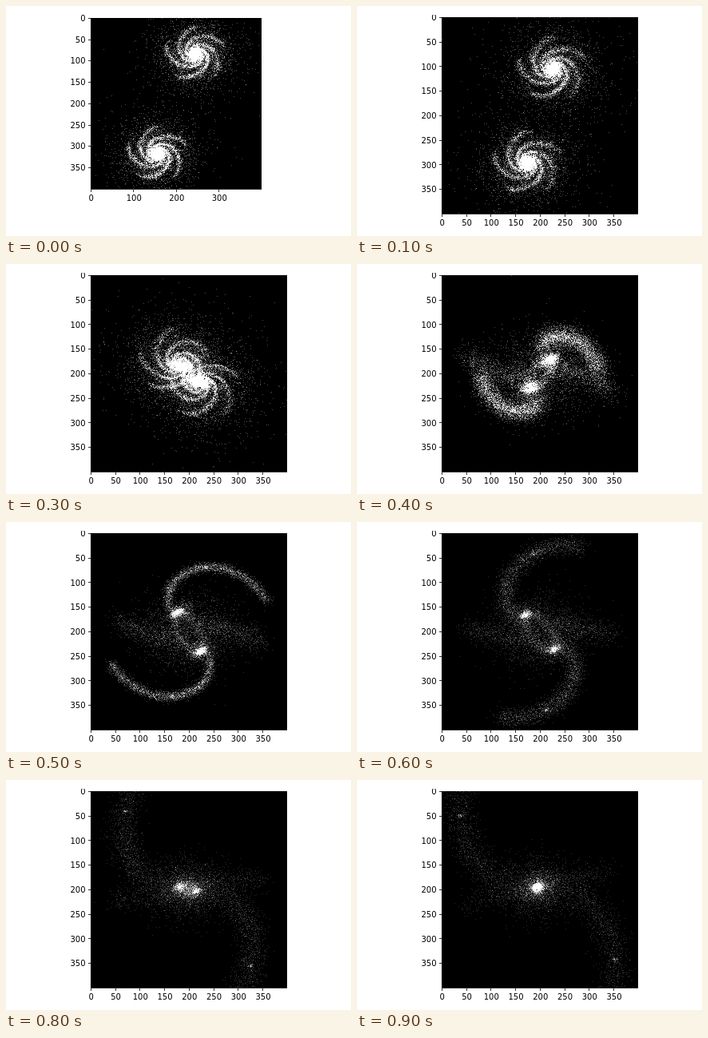
These frames come from a looping animation (432x288 px, 1000 ms). An HTML page with a canvas:

```html
<!DOCTYPE html>
<html lang="en">
<head>
<meta charset="utf-8">
<title>Galaxy collision</title>
<style>
  html, body { margin: 0; width: 100%; height: 100%; overflow: hidden; background: #fff; }
  canvas, svg { position: absolute; left: 0; top: 0; width: 432px; height: 288px; }
  text { font: 10px "DejaVu Sans", Verdana, sans-serif; fill: #000; }
</style>
</head>
<body>
<canvas id="stars" width="432" height="288"></canvas>
<svg id="axes" viewBox="0 0 432 288"></svg>
<script>
const W = 432, H = 288, STEP = 100, COUNT = 10, MEET = 4;
const TAU = Math.PI * 2, DEG = Math.PI / 180;
const ctx = document.getElementById('stars').getContext('2d');
const axes = document.getElementById('axes');

// Plot box in pixels; it shows an image of 400 x 400 units.
const SMALL = { x: 106, y: 15, size: 214, xStep: 100 };
const LARGE = { x: 106, y: 14, size: 246, xStep: 50 };
let box = SMALL;

let seed = 1;
function rand() {
  seed = (seed + 0x6D2B79F5) | 0;
  let t = Math.imul(seed ^ (seed >>> 15), 1 | seed);
  t = (t + Math.imul(t ^ (t >>> 7), 61 | t)) ^ t;
  return ((t ^ (t >>> 14)) >>> 0) / 4294967296;
}
const gauss = () => Math.sqrt(-2 * Math.log(1 - rand())) * Math.cos(TAU * rand());
const mix = (a, b, t) => a + (b - a) * t;
const polar = (r, a) => [r * Math.cos(a), r * Math.sin(a)];

// Straight lines between [time, value] points.
function track(t, ...keys) {
  let i = 0;
  while (i < keys.length - 2 && t >= keys[i + 1][0]) i++;
  const [[t0, a], [t1, b]] = keys.slice(i, i + 2);
  return mix(a, b, (t - t0) / (t1 - t0));
}

// Place of one core relative to the middle; the other is opposite.
function orbit(t) {
  const r = track(t, [0, 125], [1, 99], [2, 63], [3, 25], [5, 46], [6, 46], [7, 36], [9, 1]);
  const a = track(t, [0, -69], [1, -75], [2, -89], [3, -140], [4, -235], [5, -300], [7, -321], [9, -370]);
  return polar(r, a * DEG);
}

const density = new Float32Array(W * H);
let middle = [200, 200];

// Adds one star, in units from the middle.
function star(x, y) {
  const k = box.size / 400;
  const px = Math.floor(box.x + (middle[0] + x) * k);
  const py = Math.floor(box.y + (middle[1] + y) * k);
  if (px < box.x || py < box.y || px >= box.x + box.size || py >= box.y + box.size) return;
  density[py * W + px]++;
}

function blob(n, x, y, sx, sy = sx, angle = 0) {
  const c = Math.cos(angle), s = Math.sin(angle);
  for (let i = 0; i < n; i++) {
    const u = gauss() * sx, v = gauss() * sy;
    star(x + u * c - v * s, y + u * s + v * c);
  }
}

// Stars along a curve given by a function of 0..1.
function stream(n, spread, curve) {
  for (let i = 0; i < n; i++) {
    const [x, y] = curve(rand());
    star(x + gauss() * spread, y + gauss() * spread);
  }
}

// Exponential disc with five spiral arms; the pull drags its outer part aside.
function galaxy(x, y, pull) {
  const put = (r, a) => {
    const [u, v] = polar(r, a), drag = 0.7 * pull * r / 70;
    star(x * (1 + drag) + u, y * (1 + drag) + v * 0.9);
  };
  for (let i = 0; i < 2900; i++) {
    const r = 11 + 62 * Math.pow(rand(), 1.15);
    const arm = Math.floor(5 * Math.pow(rand(), 1.2)) * TAU / 5;
    put(r + gauss() * 2, 0.45 + arm + 2.1 * Math.log(r / 32) + gauss() * 0.13);
  }
  for (let i = 0; i < 3900; i++) put(-24 * Math.log((1 - rand()) * (1 - rand())), TAU * rand());
  blob(1700, x, y, 7 + 5 * pull, 6.4 - pull, 0.75 * pull - 0.5);
}

function approach(t) {
  const [x, y] = orbit(t), pull = Math.max(0, t - 2);
  galaxy(x, y, pull);
  galaxy(-x, -y, pull);
  return 0.3;
}

// Two shrinking cores with tidal tails that unwind outwards.
function aftermath(t) {
  const age = t - MEET, part = age / 5;
  const decay = rate => Math.exp(-rate * age);
  const [cx, cy] = orbit(t);

  const start = track(t, [4, -90], [5, -130], [7, -172], [9, -175]);
  const sweep = track(t, [4, 90], [5, 109], [7, 64], [9, 50]);
  const reach = track(t, [4, 122], [5, 172], [7, 212], [9, 262]);
  const power = track(t, [4, 0.5], [5, 0.5], [7, 0.75], [9, 1]);
  const width = track(t, [4, 11], [5, 5.5], [7, 15], [9, 17]);
  const knot = track(t, [4, 0.4], [5, 0.5], [7, 0.8], [9, 0.76]);
  const root = 44 + 4 * age;
  const tail = u => polar(mix(root, reach, Math.pow(u, power)), (start + sweep * u) * DEG);
  const arc = u => {
    const c = Math.cos(Math.PI * u), s = 0.45 * Math.sin(Math.PI * u);
    return [cx * c + cy * s, cy * c - cx * s];
  };
  const fan = u => [10 + 140 * u, -14 + 38 * (1.4 - 0.4 * age) * u * u];

  for (const side of [1, -1]) {
    const turned = curve => u => curve(u).map(v => v * side);
    const [kx, ky] = turned(tail)(knot);
    const x = cx * side, y = cy * side;
    stream(850 + 2500 * decay(0.5), width, turned(tail));
    stream(450, 6, turned(arc));
    stream(900 * decay(0.25), 13, turned(fan));
    blob(45, kx, ky, 3, 2);
    blob(150 + 650 * decay(0.6), x, y, 6 + 4 * decay(1), 3 + 2.5 * decay(1), -0.4);
    blob(480, x, y, mix(16, 20, part), mix(11, 14, part), -0.3);
  }
  blob(1700, 0, 0, mix(55, 38, part), mix(44, 29, part));
  return 0.16 + 0.12 * decay(1.1);
}

function drawStars(t) {
  seed = 7001 + t * 97;
  density.fill(0);
  const drift = 5 * Math.max(0, t - 7) / 2;
  middle = [200.5 - drift, 201 - drift];
  const gain = t < MEET ? approach(t) : aftermath(t);
  const img = ctx.createImageData(W, H);
  density.forEach((n, i) => {
    img.data.fill(Math.min(255, n * gain * 255), i * 4, i * 4 + 3);
    img.data[i * 4 + 3] = 255;
  });
  ctx.clearRect(0, 0, W, H);
  ctx.putImageData(img, 0, 0, box.x, box.y, box.size, box.size);
}

function drawAxes() {
  const { x, y, size, xStep } = box, bottom = y + size;
  const bar = (bx, by, w, h) => `<rect x="${bx}" y="${by}" width="${w}" height="${h}" fill="#333"/>`;
  const label = (v, tx, ty, anchor) => `<text x="${tx}" y="${ty}" text-anchor="${anchor}">${v}</text>`;
  const offset = v => (v + 0.5) * size / 400;
  let out = bar(x, bottom, size, 1);
  for (let v = 0; v < 400; v += 50) {
    const ty = y + offset(v);
    out += bar(x - 3, Math.floor(ty), 3, 1) + label(v, x - 6.5, Math.round(ty + 3.7), 'end');
  }
  for (let v = 0; v < 400; v += xStep) {
    const tx = x + offset(v);
    out += bar(Math.floor(tx), bottom + 1, 1, 3) + label(v, tx + 0.5, bottom + 15, 'middle');
  }
  // The top label is cut off at this height.
  axes.innerHTML = out + '<rect width="432" height="11" fill="#fff"/>';
}

let shown = -1;
function render(time) {
  const step = Math.floor(time / STEP) % COUNT;
  if (step === shown) return;
  shown = step;
  box = step ? LARGE : SMALL;
  drawStars(step);
  drawAxes();
}

const start = performance.now();
function loop() {
  render(performance.now() - start);
  requestAnimationFrame(loop);
}
loop();
</script>
</body>
</html>
```
